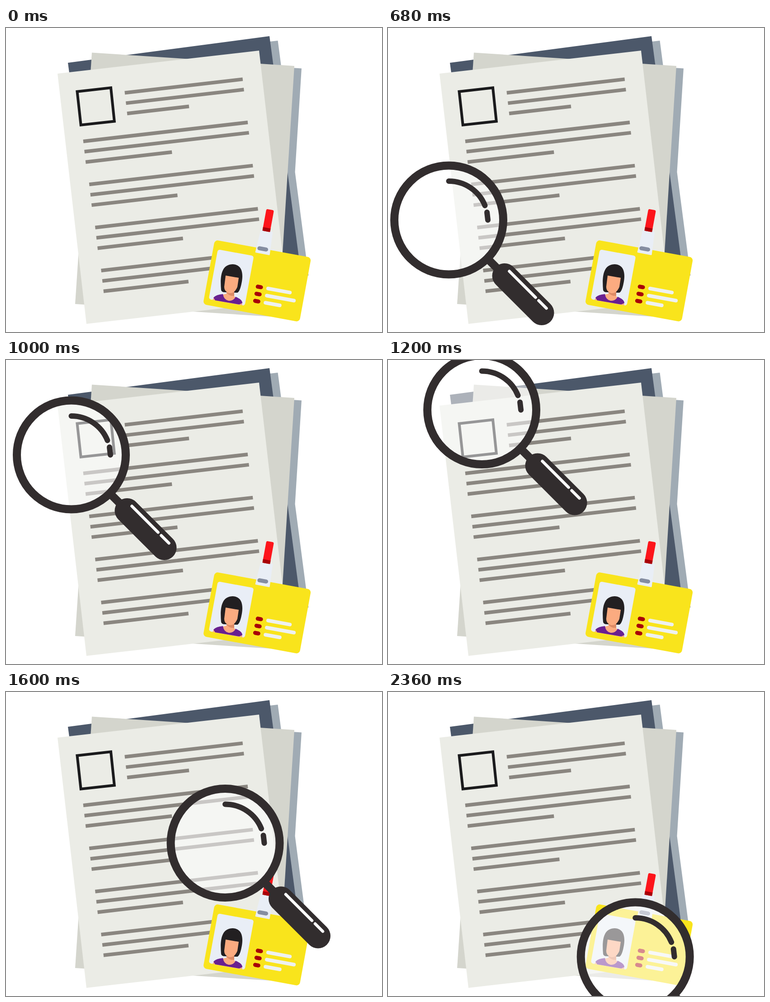
An HTML page for the animation above (3 s loop, 832 by 673 pixels).

```html
<!DOCTYPE html>
<html lang="en">
<head>
<meta charset="utf-8">
<title>Document search</title>
<style>
  html, body { margin: 0; width: 100%; height: 100%; overflow: hidden; background: #fff; }
  svg { display: block; width: 100%; height: 100%; }
  .round { fill: none; stroke-linecap: round; }
</style>
</head>
<body>
<svg viewBox="0 0 832 673">
  <!-- sheets -->
  <path fill="#a0abb4" d="M150 80 601.5 28 669.500 548 230 600ZM600 86 654 89.5 630 470 600 470Z"/>
  <path fill="#4c586a" d="M137 77 583 18 653 545 207 600Z"/>
  <path fill="#d4d5cd" d="M190 54.5 638 84 603 640 153 611Z"/>
  <path fill="#ebece6" d="M114 101 560 50 624 604 178 655Z"/>
  <path fill="none" stroke="#1a1a1c" stroke-width="6" d="M157.5 140.7 232 132.300 239.800 206.500 165.700 214.800Z"/>
  <path id="lines" fill="none" stroke="#8a8680" stroke-width="8"/>

  <!-- badge -->
  <g transform="translate(462 469) rotate(10.4)">
    <rect width="217" height="145" rx="8" fill="#f9e41c"/>
    <rect x="10.500" y="19.500" width="81" height="112" rx="5" fill="#e9eef6"/>
    <path fill="#e9eef6" stroke="#e9eef6" stroke-width="3" stroke-linejoin="round" d="M97.5-39h24l2.500 49h-29.500Z"/>
    <rect x="100" y="-88" width="17" height="49" rx="3.5" fill="#fd151b"/>
    <path fill="#a80008" d="M100-47h17v8h-17Z"/>
    <path class="round" stroke="#858da1" stroke-width="9" d="M100.500.5h15"/>
    <path id="bullets" class="round" stroke="#a80008" stroke-width="9"/>
    <path id="bars" class="round" stroke="#eef1f0" stroke-width="8"/>
  </g>

  <!-- portrait -->
  <path fill="#221f21" d="M476 580C473 546 478 523 502 523C525 524 525 548 521 566C519 576 516 584 512 586L484 585Q477 585 476 580Z"/>
  <path fill="#fbab80" d="M457 602 461 596 488 588 489 576 505 580 505 594 522 608 523 614Z"/>
  <path fill="#dd8a65" d="M488 583 505 581V593Q494 594 488 586Z"/>
  <path fill="#fbab80" d="M486 548 515 553 512 573Q506 588 494 587Q482 583 483 572Z"/>
  <path fill="#682090" d="M459 597Q465 590 480 589Q482 602 493 604Q504 604 508 595Q523 601 523 609L516 612 463 603Z"/>

  <!-- magnifier, centred on its lens -->
  <g id="lens" stroke="#322d2e">
    <circle r="120.500" fill="#fff" fill-opacity=".54" stroke-width="18"/>
    <path class="round" stroke-width="12" d="M0-86A86 86 0 0 1 80-32M84.5-17 86.5 0"/>
    <path stroke-width="18" d="M88 88 112 112"/>
    <path class="round" stroke-width="55" d="M123.5 123.5 205.5 205.5"/>
    <path class="round" stroke="#fff" stroke-width="6.5" d="M134 113.500 192 171.500M199 178.500 216 195.500"/>
  </g>
</svg>
<script>
const LOOP = 3000, STEP = 40, ENTER = 240;
const byId = id => document.getElementById(id);

// Right-aligned text blocks; the first one leaves room for the square
const SLOPE = -0.1152;
let text = '';
for (let block = -1; block < 4; block++) {
  const head = block < 0;
  const width = head ? 261 : 364 - 2 * block;
  const x = 535 + 11.2 * block - width;
  const y = 209 + 95.6 * block - width * SLOPE;
  for (let row = 0; row < 3; row++) {
    const w = row < 2 ? width : head ? 137 : 191 - block;
    text += `M${x + 2.6 * row} ${y + 22.9 * row}l${w} ${w * SLOPE}`;
  }
}
byId('lines').setAttribute('d', text);

const badgeRows = (x, widths) => widths.map((w, i) => `M${x} ${84.7 + 16 * i}h${w}`).join('');
byId('bullets').setAttribute('d', badgeRows(112.3, [7, 7, 7]));
byId('bars').setAttribute('d', badgeRows(135.5, [49, 61, 32]));

// Key points of the lens: time, x, y
const route = [
  [200, 118, 806], [680, 134.5, 425], [1000, 144.5, 210], [1160, 182, 120],
  [1320, 311, 109], [1400, 383.5, 142.5], [1600, 485, 334.5], [1760, 523, 470],
  [1920, 543.5, 571], [2150, 601, 609], [2360, 547.2, 586]
];

// Smooth curve through the route, with slopes taken from the neighbours
function lensAt(t) {
  const last = route.length - 1;
  if (t >= route[last][0]) return route[last].slice(1);
  const i = route.findIndex((p, k) => t < route[k + 1][0]);
  const a = route[i], b = route[i + 1];
  const before = route[Math.max(i - 1, 0)], after = route[Math.min(i + 2, last)];
  const span = b[0] - a[0], u = (t - a[0]) / span;
  return [1, 2].map(k => {
    const ma = (b[k] - before[k]) / (b[0] - before[0]) * span;
    const mb = (after[k] - a[k]) / (after[0] - a[0]) * span;
    const d = b[k] - a[k];
    return a[k] + u * (ma + u * (3 * d - 2 * ma - mb + u * (ma + mb - 2 * d)));
  });
}

const lens = byId('lens');
const start = performance.now();
function draw() {
  const t = Math.floor((performance.now() - start) % LOOP / STEP) * STEP;
  const shown = t >= ENTER;
  lens.style.display = shown ? '' : 'none';
  if (shown) lens.setAttribute('transform', `translate(${lensAt(t)})`);
  requestAnimationFrame(draw);
}
draw();
</script>
</body>
</html>
```
